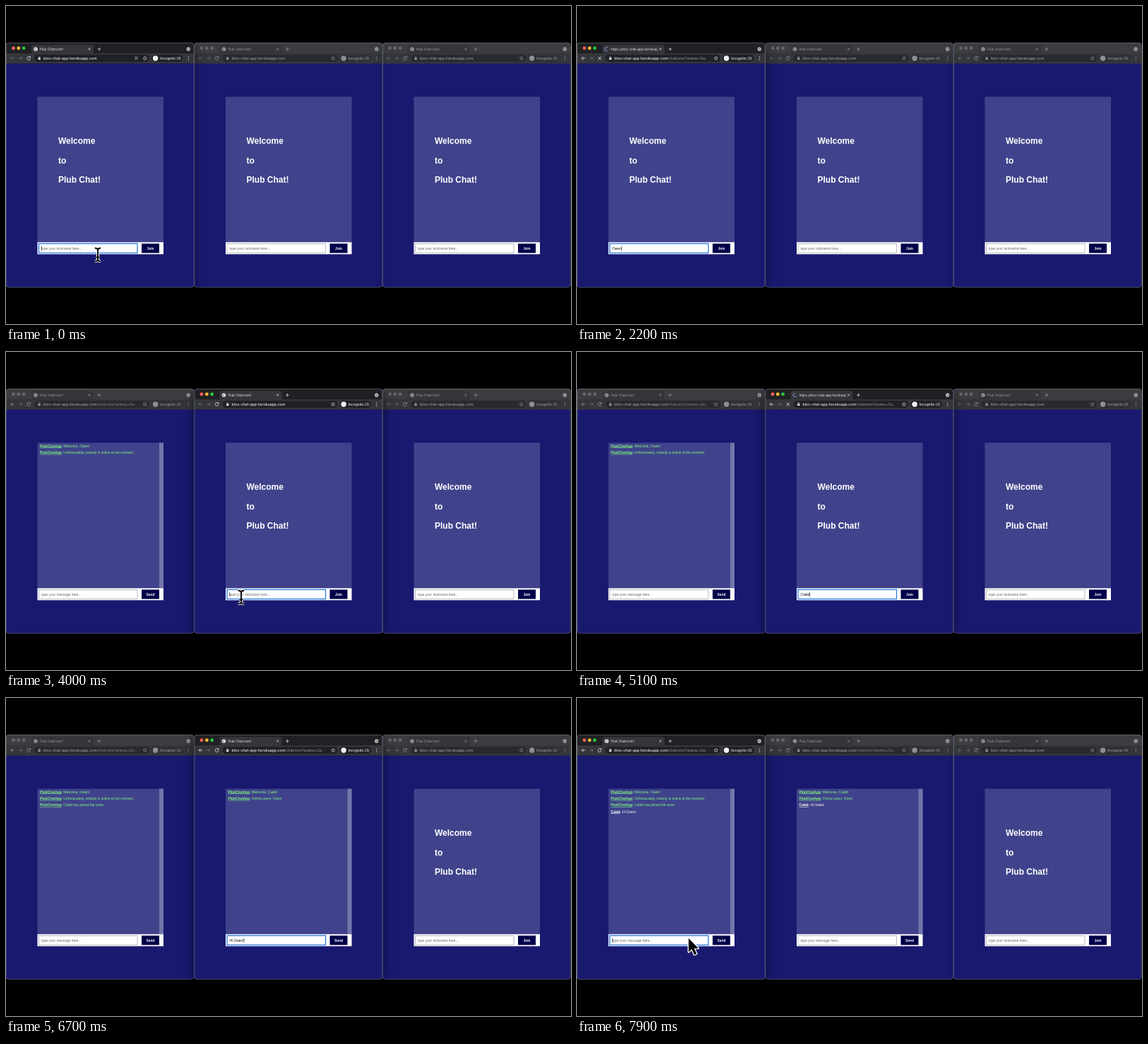
Animation of 800x450 px, one loop 8000 ms. Source, as an HTML page with a canvas:

```html
<!DOCTYPE html>
<html lang="en">
<head>
<meta charset="utf-8">
<title>Chat demo</title>
<style>
  html, body { margin: 0; width: 100%; height: 100%; overflow: hidden; background: #000; }
  canvas { display: block; width: 800px; height: 450px; }
</style>
</head>
<body>
<canvas id="stage" width="800" height="450"></canvas>
<script>
const LOOP = 8000;
const c = document.getElementById('stage').getContext('2d');
const PAGE = "'Liberation Sans', Arial, sans-serif";
const UI = "Inter, 'Liberation Sans', sans-serif";
const BOT = 'PlubChatApp';
const HOST = 'bloo-chat-app.herokuapp.com';

// Draws text on its baseline and returns the x where it ends.
function text(s, x, y, size, color, { font = PAGE, weight = 400, align = 'left' } = {}) {
  c.font = `${weight} ${size}px ${font}`;
  c.fillStyle = color;
  c.textAlign = align;
  c.fillText(s, x, y);
  return x + c.measureText(s).width;
}
function rect(x, y, w, h, color, r = 0) {
  c.fillStyle = color;
  c.beginPath();
  c.roundRect(x, y, w, h, r);
  c.fill();
}
function disc(x, y, r, color) {
  c.fillStyle = color;
  c.beginPath();
  c.arc(x, y, r, 0, 7);
  c.fill();
}
function path(d, color, width = 0.8) {
  c.strokeStyle = color;
  c.lineWidth = width;
  c.stroke(new Path2D(d));
}
const typed = (s, t, start, step) => s.slice(0, Math.max(0, Math.floor((t - start) / step) + 1));

// What each browser window shows at time t.
function windowsAt(t) {
  const active = t < 3500 || t >= 7800 ? 0 : 1;
  const hello = [['Caleb', 'Hi Owen!']];
  const sent = t >= 6800 ? hello : [];

  const first = { x: 0, user: 'Ow', go: 1700, ready: 2600, text: '', base: 0, log: [
    [BOT, 'Welcome, Owen!'],
    [BOT, 'Unfortunately, nobody is online at the moment.'],
    ...(t >= 5500 ? [[BOT, 'Caleb has joined the room.']] : []),
    ...sent] };
  if (t < 2600) first.text = typed('Owen', t, 1000, 180);
  first.base = t >= 7800 ? 7800 : t >= 2600 ? 2600 : t >= 1000 ? (t >= 1700 ? 1700 : t) : 0;

  const second = { x: 266.5, user: 'Ca', go: 4700, ready: 5500, text: '', base: 3500, log: [
    [BOT, 'Welcome, Caleb!'],
    [BOT, 'Online users: Owen'],
    ...sent] };
  if (t < 5500) second.text = typed('Caleb', t, 4100, 110);
  else if (t < 6800) second.text = typed('Hi Owen!', t, 5900, 100);
  second.base = t >= 6800 ? 6800 : t >= 5900 ? (t < 6700 ? t : 6700)
    : t >= 5500 ? 5500 : t >= 4700 ? 4700 : t >= 4100 ? t : 3500;

  const third = { x: 533, go: Infinity, ready: Infinity, text: '', base: 0, log: [] };
  return [first, second, third].map((w, i) => ({ ...w,
    active: i === active,
    loading: t >= w.go && t < w.ready,
    visited: t >= w.go,
    chat: t >= w.ready,
    caret: i === active && (t - w.base) % 1060 < 530 }));
}

function chrome(w, t) {
  const ink = w.active ? '#e8eaed' : '#999b9f';
  const soft = w.active ? '#9aa0a6' : '#85878b';
  const dim = '#707276';
  rect(0, 52, 266, 30, w.active ? '#202124' : '#3c3d41');
  rect(36, 55, 88, 14, '#35363a', 3);
  rect(0, 67, 266, 14.5, '#35363a');

  const lights = w.active ? ['#ff5f57', '#febc2e', '#28c840'] : Array(3).fill('#66676b');
  lights.forEach((color, i) => disc(10.5 + i * 7.3, 59.7, 2.4, color));

  if (w.loading) {
    const a = t / 160;
    c.strokeStyle = '#8ab4f8';
    c.lineWidth = 0.9;
    c.beginPath();
    c.arc(42, 61, 2.5, a, a + 4.2);
    c.stroke();
  } else {
    disc(42, 61, 2.8, ink);
    path('M40.3 60.2l1.7 .8l-.4 1.6M42.6 59l1.2 1', '#35363a', 0.7);
  }
  c.save();
  c.beginPath();
  c.rect(48, 55, 66, 12);
  c.clip();
  text(w.loading ? 'https://' + HOST : 'Plub Chatroom!', 48, 62.7, 4.5, ink, { font: UI });
  c.restore();
  path('M116.6 59.4l3 3m0 -3l-3 3', ink, 0.7);
  path('M129.6 61h4.8m-2.4 -2.4v4.8', ink, 0.7);
  disc(258.2, 61, 2.7, w.active ? '#b9bbbf' : '#a0a2a6');
  path('M257 60.4l1.2 1.2l1.2 -1.2', '#202124', 0.8);

  path('M11.6 74h-4.8m2.2 -2.3l-2.3 2.3l2.3 2.3', w.visited ? ink : dim);
  path('M17.8 74h4.8m-2.2 -2.3l2.3 2.3l-2.3 2.3', dim);
  if (w.loading) path('M30 71.8l4.4 4.4m0 -4.4l-4.4 4.4', ink, 0.9);
  else path('M34 72.5a2.4 2.4 0 1 0 .4 2.2M34.5 71.2v1.9h-1.9', ink);

  rect(40, 69, 163, 10, w.active ? '#202124' : '#292a2d', 5);
  rect(45.6, 73.3, 3.2, 2.8, ink, 0.4);
  path('M46.2 73.5v-.8a1 1 0 0 1 2 0v.8', ink, 0.6);
  const end = text(HOST, 53, 75.8, 5.15, ink, { font: UI, weight: 500 });
  if (w.visited) text(`/chatroom?uname=${w.user}...`, end, 75.8, 4.95, soft, { font: UI });
  else if (w.active && t < 1000) text('⌘', 184.5, 76, 6, soft, { font: "'DejaVu Sans', sans-serif", align: 'center' });
  path('M196.7 71.3l.8 1.7l1.9 .2l-1.4 1.3l.4 1.8l-1.7 -.9l-1.7 .9l.4 -1.8l-1.4 -1.3l1.9 -.2z', ink, 0.6);

  rect(206, 69, 44.5, 10, w.active ? '#202124' : '#2f3033', 5);
  disc(211.6, 74, 3.7, w.active ? '#f1f3f4' : '#8d8f93');
  text('Incognito (3)', 218.3, 75.8, 4.85, ink, { font: UI, weight: 500 });
  [71.8, 74, 76.2].forEach(y => disc(258.3, y, 0.6, ink));
}

function page(w) {
  rect(0, 81.5, 266, 316.5, '#191970');
  rect(44.5, 128.5, 178.5, 206, '#40438b');
  if (w.chat) {
    rect(217, 128.5, 6, 206, '#7376aa');
    w.log.forEach(([who, say], i) => {
      const y = 134.8 + i * 9.3;
      const color = who === BOT ? '#80f880' : '#fff';
      const end = text(who, 48, y, 4.85, color, { weight: 700 });
      rect(48, y + 0.6, end - 48, 0.5, color);
      text(': ' + say, end, y, 4.85, color);
    });
  } else {
    ['Welcome', 'to', 'Plub Chat!'].forEach((s, i) =>
      text(s, 74, 195.3 + i * 27.5, 12, '#fff', { weight: 700 }));
  }

  rect(44.5, 334.3, 178.5, 17, '#fff');
  c.lineWidth = w.active ? 1.3 : 0.6;
  c.strokeStyle = w.active ? '#2f7be0' : '#8c8ca0';
  c.strokeRect(46.5, 336.3, 139.5, 13.2);
  const end = w.text ? text(w.text, 50, 344.8, 4.9, '#111') : 50;
  if (!w.text) text(`type your ${w.chat ? 'message' : 'nickname'} here...`, 50, 344.8, 4.9, '#666');
  if (w.caret) rect(end, 340, 0.6, 6, '#000');
  rect(192, 336.3, 25, 13.2, '#00004a');
  text(w.chat ? 'Send' : 'Join', 204.5, 344.7, 4.9, '#fff', { weight: 700, align: 'center' });
}

function browser(w, t) {
  c.save();
  c.translate(w.x, 0);
  c.save();
  c.shadowColor = `rgba(0,0,0,${w.active ? 0.55 : 0.3})`;
  c.shadowBlur = w.active ? 16 : 8;
  c.shadowOffsetY = 4;
  rect(0, 52, 266, 346, '#191970', 4);
  c.restore();
  c.save();
  c.beginPath();
  c.roundRect(0, 52, 266, 346, 4);
  c.clip();
  chrome(w, t);
  page(w);
  c.restore();
  c.strokeStyle = 'rgba(150,152,165,.65)';
  c.lineWidth = 0.7;
  c.beginPath();
  c.roundRect(0.3, 52.2, 266, 346, 4);
  c.stroke();
  c.restore();
}

const MOVES = [
  [0, 130, 352], [2500, 130, 352], [3100, 297.5, 342], [3500, 333, 347],
  [7450, 333, 347], [7800, 158, 340], [LOOP, 158, 340]
];
function pointer(t) {
  if ((t >= 1000 && t < 2500) || (t >= 4100 && t < 7450)) return;
  const i = MOVES.findIndex(m => m[0] > t);
  const [t0, x0, y0] = MOVES[i - 1], [t1, x1, y1] = MOVES[i];
  const p = (t - t0) / (t1 - t0), k = p * p * (3 - 2 * p);
  c.save();
  c.translate(x0 + (x1 - x0) * k, y0 + (y1 - y0) * k);
  c.lineJoin = 'round';
  if (t < 2650 || (t >= 3600 && t < 7600)) {
    const beam = 'M-4.2 -9.5q3.2 0 4.2 2.2q1 -2.2 4.2 -2.2M0 -7.3v14.6M-4.2 9.5q3.2 0 4.2 -2.2q1 2.2 4.2 2.2M-2.6 3.5h5.2';
    path(beam, '#fff', 3.8);
    path(beam, '#000', 1.9);
  } else {
    const arrow = 'M0 0v19.6l4.6 -4.2l3.6 8l3.2 -1.5l-3.6 -7.7h6.2z';
    path(arrow, '#fff', 2.6);
    c.fillStyle = '#000';
    c.fill(new Path2D(arrow));
  }
  c.restore();
}

function draw(t) {
  c.fillStyle = '#000';
  c.fillRect(0, 0, 800, 450);
  windowsAt(t).sort((a, b) => a.active - b.active).forEach(w => browser(w, t));
  pointer(t);
}

const start = performance.now();
function tick() {
  draw((performance.now() - start) % LOOP);
  requestAnimationFrame(tick);
}
tick();
</script>
</body>
</html>
```
